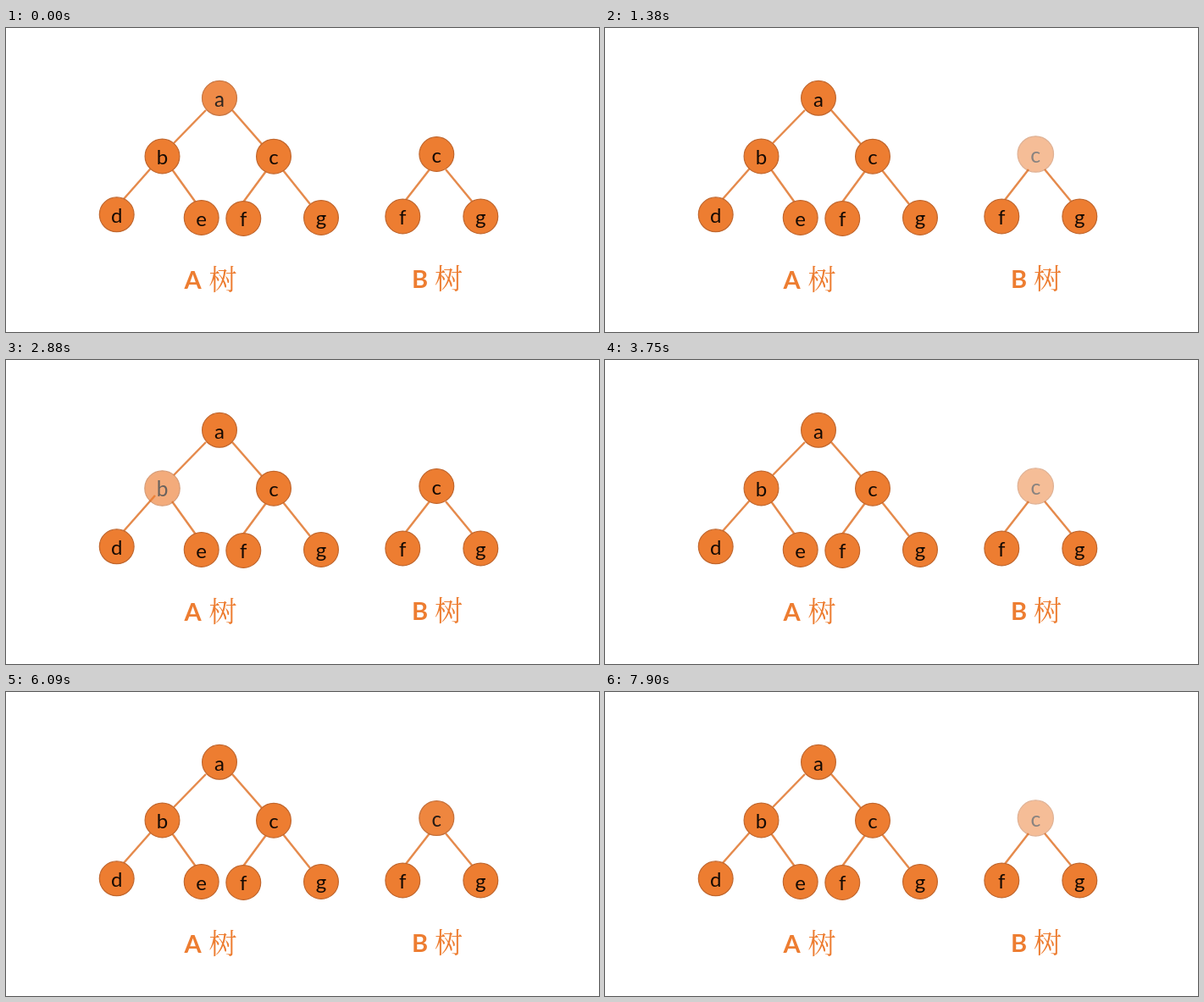
Recreate the animation shown at these times as an HTML page with a canvas. Size 700 by 359 pixels, loop 8000 ms.

```html
<!DOCTYPE html>
<html lang="zh">
<head>
<meta charset="utf-8">
<title>Tree comparison</title>
<style>
  html, body { margin: 0; width: 100%; height: 100%; overflow: hidden; background: #fff; }
  canvas { display: block; width: 700px; height: 359px; }
</style>
</head>
<body>
<canvas id="stage"></canvas>
<script>
const W = 700, H = 359, LOOP = 8000, PULSE = 1000;
const ORANGE = '#ed7d31', RIM = '#c0662d', EDGE = '#e58a4c';
const R = 20.4;

// letter, centre x, centre y, text baseline
const nodes = {
  a:  ['a', 252, 82.8, 92.5],
  b:  ['b', 184.5, 151.5, 161],
  c:  ['c', 316, 151.7, 161],
  d:  ['d', 130.7, 220.3, 230],
  e:  ['e', 230.7, 224, 233.5],
  f:  ['f', 280.3, 225, 234],
  g:  ['g', 372, 224, 233],
  c2: ['c', 508.3, 149, 158.5],
  f2: ['f', 468.3, 222.5, 232],
  g2: ['g', 560.3, 222.5, 232]
};

const edges = [
  [236, 97, 198, 136], [267, 97, 302, 137],
  [176, 160, 138, 203], [196, 167, 224, 206],
  [307, 169, 279, 207], [327, 168, 359, 208],
  [500, 167, 472, 203], [519, 167, 552, 207]
];

// each visited node and the time its pulse starts
const pulses = [
  ['a', -45], ['c2', 995], ['b', 2025], ['c2', 3090],
  ['d', 4085], ['c2', 5120], ['e', 6165], ['c2', 7225]
];

const dpr = window.devicePixelRatio || 1;

function makeCanvas(el) {
  el.width = Math.round(W * dpr);
  el.height = Math.round(H * dpr);
  const g = el.getContext('2d');
  g.scale(dpr, dpr);
  return g;
}

const ctx = makeCanvas(document.getElementById('stage'));
const layer = makeCanvas(document.createElement('canvas'));

function write(g, text, x, y, font, color, align) {
  g.font = font;
  g.fillStyle = color;
  g.textAlign = align;
  g.fillText(text, x, y);
}

function drawNode(g, [letter, x, y, base], scale) {
  g.save();
  g.translate(x, y);
  g.scale(scale, scale);
  g.beginPath();
  g.arc(0, 0, R, 0, Math.PI * 2);
  g.fillStyle = ORANGE;
  g.fill();
  g.strokeStyle = RIM;
  g.lineWidth = 1.2;
  g.stroke();
  write(g, letter, 0, base - y, '24px Lato, Carlito, sans-serif', '#140a04', 'center');
  g.restore();
}

// Quick fade to half, hold, quick return; the size swells and shrinks evenly.
function pulseAt(key, t) {
  for (const [name, start] of pulses) {
    const p = (t - start) / PULSE;
    if (name === key && p > 0 && p < 1) {
      const near = Math.min(p, 1 - p);
      return { alpha: 1 - 0.5 * Math.min(1, near / 0.2), scale: 1 + 0.1 * near };
    }
  }
  return null;
}

function drawFaded(node, { alpha, scale }) {
  layer.clearRect(0, 0, W, H);
  drawNode(layer, node, scale);
  ctx.globalAlpha = alpha;
  ctx.drawImage(layer.canvas, 0, 0, W, H);
  ctx.globalAlpha = 1;
}

function caption(letter, x, y, hanX, hanY) {
  write(ctx, letter, x, y, 'bold 29px Lato, Carlito, sans-serif', ORANGE, 'left');
  write(ctx, '树', hanX, hanY, '33px "Noto Serif CJK SC", "Noto Sans CJK SC", "Noto Sans CJK", serif', ORANGE, 'left');
}

function draw(t) {
  ctx.fillStyle = '#fff';
  ctx.fillRect(0, 0, W, H);

  ctx.strokeStyle = EDGE;
  ctx.lineWidth = 2.5;
  for (const [x1, y1, x2, y2] of edges) {
    ctx.beginPath();
    ctx.moveTo(x1, y1);
    ctx.lineTo(x2, y2);
    ctx.stroke();
  }

  for (const key in nodes) {
    const pulse = pulseAt(key, t);
    if (pulse) drawFaded(nodes[key], pulse);
    else drawNode(ctx, nodes[key], 1);
  }

  caption('A', 210.5, 308, 239.5, 309);
  caption('B', 479, 307, 506, 307.5);
}

const begin = performance.now();
function tick() {
  draw((performance.now() - begin) % LOOP);
  requestAnimationFrame(tick);
}
tick();
</script>
</body>
</html>
```
